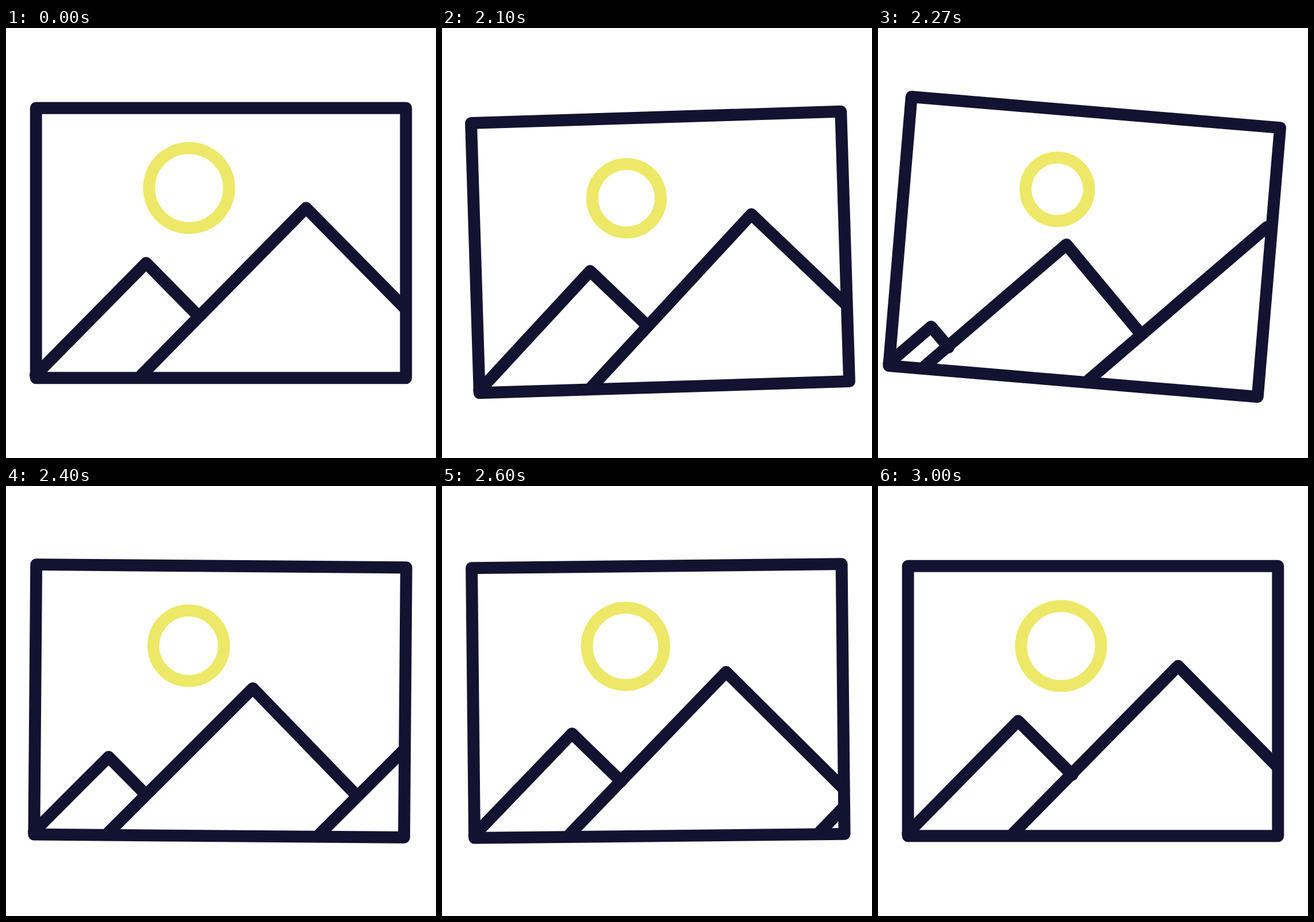
Recreate the animation shown at these times as an HTML page. Size 748 by 748 pixels, loop 3.02 s.

```html
<!DOCTYPE html>
<html lang="en">
<head>
<meta charset="utf-8">
<title>Picture</title>
<style>
  html, body { margin: 0; width: 100%; height: 100%; overflow: hidden; background: #fff; }
  svg { display: block; width: 100%; height: 100%; }
</style>
</head>
<body>
<svg viewBox="0 0 748 748">
  <clipPath id="inside"><rect width="695.8" height="620"/></clipPath>
  <g id="picture" fill="none" stroke="#121331" stroke-width="20.87" stroke-linecap="round" stroke-linejoin="round">
    <circle id="sun" cx="318.4" cy="278.3" stroke="#ede867"/>
    <g clip-path="url(#inside)">
      <path id="middle"/>
      <path id="front" fill="#fff"/>
      <path id="back"/>
    </g>
    <rect x="52.2" y="139.2" width="643.6" height="469.6"/>
  </g>
</svg>
<script>
const LOOP = 3020, START = 2000, GROUND = 604, RUN = 0.985;
const [picture, sun, middle, front, back] =
  ['picture', 'sun', 'middle', 'front', 'back'].map(id => document.getElementById(id));

const mix = (a, b, k) => a + (b - a) * k;
const smooth = u => u * u * (3 - 2 * u);

// Cubic ease with horizontal handles of lengths set by x1 and x2
const bezier = (x1, x2) => u => {
  let lo = 0, hi = 1;
  for (let i = 0; i < 24; i++) {
    const s = (lo + hi) / 2, r = 1 - s;
    if (3 * r * r * s * x1 + 3 * r * s * s * x2 + s * s * s < u) lo = s; else hi = s;
  }
  return smooth(hi);
};
const slide = bezier(0.4, 0.13);
const grow = bezier(0.34, 0.1);

// Keys are [time, value, ease into the key]
function track(keys, t) {
  if (t <= keys[0][0]) return keys[0][1];
  for (let i = 1; i < keys.length; i++) {
    const [t0, v0] = keys[i - 1], [t1, v1, ease = smooth] = keys[i];
    if (t < t1) return mix(v0, v1, ease((t - t0) / (t1 - t0)));
  }
  return keys[keys.length - 1][1];
}

const ANGLE = [[START, 0], [2083, -2], [2250, 5], [2500, -2], [2710, 1], [3000, 0]];
const DROP = [[START, 0], [2125, 18], [2390, 0]];
const RADIUS = [[START, 69.6], [2167, 54], [3000, 69.6, grow]];
const TRAVEL = [[START, 0], [3000, 1, slide]];

function mountain(x, y) {
  const half = (GROUND - y) * RUN;
  return `M${x - half} ${GROUND}L${x} ${y}L${x + half} ${GROUND}`;
}

function draw(t) {
  const p = track(TRAVEL, t);
  picture.setAttribute('transform',
    `translate(0 ${track(DROP, t)}) rotate(${track(ANGLE, t)} 374 198)`);
  sun.setAttribute('r', track(RADIUS, t));

  // The middle peak follows a slightly curved path to the front position
  const bend = p * (1 - p) * (-135 + 477 * p - 340 * p * p);
  middle.setAttribute('d', mountain(mix(243.7, 522, p), mix(408.7, 313, p) + bend));
  front.setAttribute('d', mountain(mix(522, 989, p), 313));

  // The new mountain grows out of the corner
  back.setAttribute('d', p === 0 ? '' :
    `M51.7 ${GROUND}L${mix(51.7, 243.7, p)} ${mix(GROUND, 408.7, p)}` +
    `L${mix(51.7, 338, p)} ${mix(GROUND, 502.5, p)}`);
}

// Poses advance 40 times a second, on a 20/30 ms beat
function pose(ms) {
  const t = ms % LOOP, beat = Math.floor(t / 50) * 50;
  return beat + (t - beat >= 20 ? 25 : 0);
}

const begin = performance.now();
function tick() {
  draw(pose(performance.now() - begin));
  requestAnimationFrame(tick);
}
tick();
</script>
</body>
</html>
```
